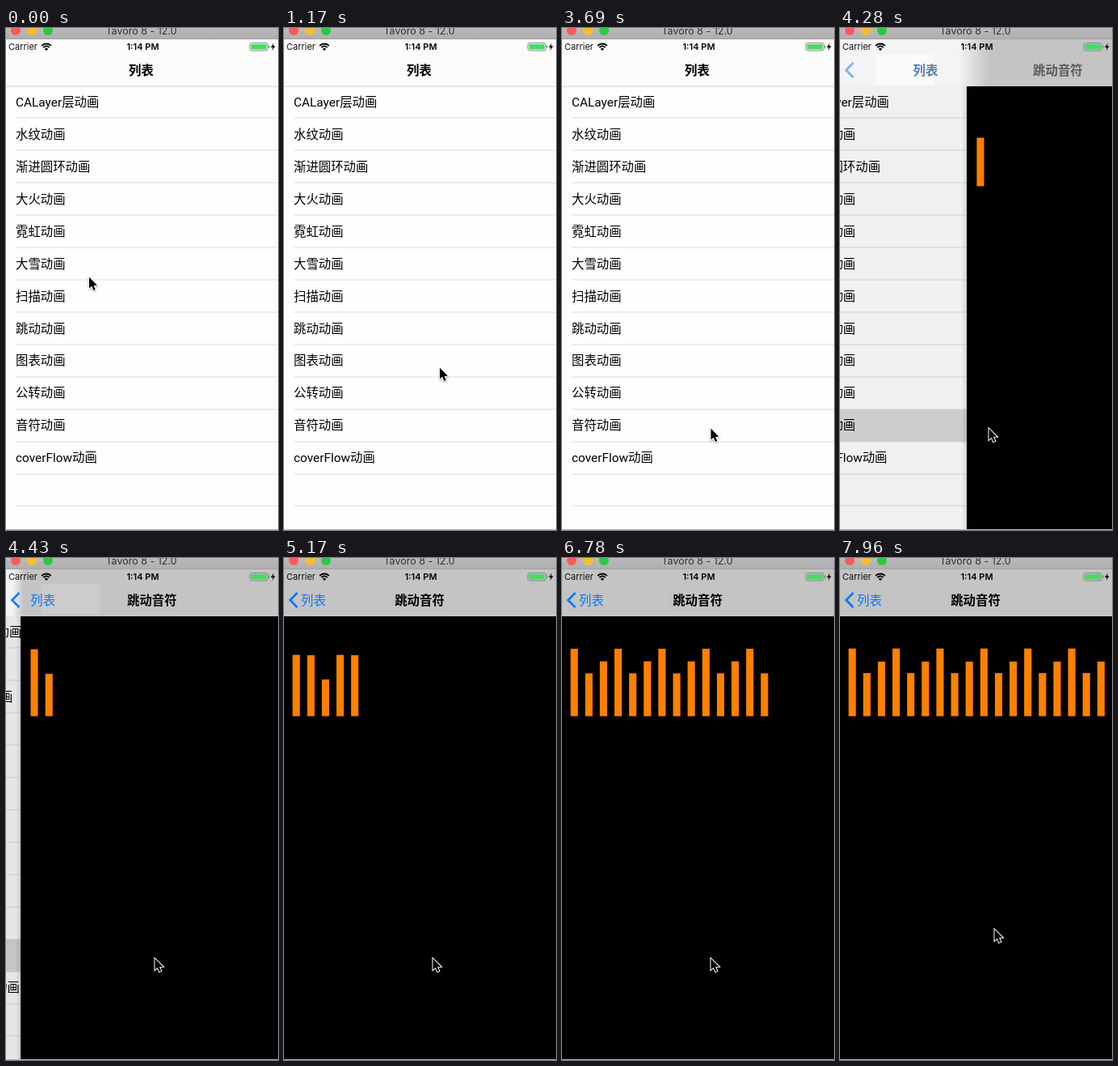
Animation of 337 by 620 pixels, one loop 8000 ms. Source, as an HTML page with a canvas:

```html
<!DOCTYPE html>
<html lang="zh">
<head>
<meta charset="utf-8">
<style>
  html, body { margin: 0; width: 100%; height: 100%; overflow: hidden; background: #fff; }
  canvas { display: block; }
</style>
</head>
<body>
<canvas id="stage" width="337" height="620"></canvas>
<script>
const ctx = document.getElementById('stage').getContext('2d');
const W = 337, H = 620, LOOP = 8000;
const STEP = 147.4;
const CAPTURE = 150.25;
const LIST_FONT = '15.4px Roboto, "Noto Sans CJK SC", "Noto Sans CJK", sans-serif';
const UI_FONT = 'Inter, "Noto Sans", sans-serif';
const ROWS = ['CALayer层动画', '水纹动画', '渐进圆环动画', '大火动画', '霓虹动画', '大雪动画',
  '扫描动画', '跳动动画', '图表动画', '公转动画', '音符动画', 'coverFlow动画'];
const ROW_H = 39.93, SELECTED = 10, NAV_BOTTOM = 72;

// Pointer path: step, x, y
const POINTER = [
  [0, 103, 307], [1, 113, 313], [3, 180, 345], [5, 221, 385], [8, 193, 419], [9, 193, 419],
  [11, 165, 399], [13, 144, 430], [15, 154, 468], [17, 169, 455], [23, 169, 455],
  [25, 184.5, 494], [48, 184.5, 494], [51, 191.5, 458], [60, 191.5, 458]
];

const mix = (a, b, p) => a + (b - a) * p;

function rect(x, y, w, h, color) {
  ctx.fillStyle = color;
  ctx.fillRect(x, y, w, h);
}

function text(str, x, y, font, color, align = 'left', alpha = 1) {
  ctx.globalAlpha = alpha;
  ctx.font = font;
  ctx.fillStyle = color;
  ctx.textAlign = align;
  ctx.fillText(str, x, y);
  ctx.globalAlpha = 1;
}

function polygon(...points) {
  ctx.beginPath();
  for (let i = 0; i < points.length; i += 2) ctx.lineTo(points[i], points[i + 1]);
  ctx.closePath();
}

function gradient(x0, y0, x1, y1, from, to) {
  const g = ctx.createLinearGradient(x0, y0, x1, y1);
  g.addColorStop(0, from);
  g.addColorStop(1, to);
  return g;
}

function drawList(shift, p) {
  rect(0, NAV_BOTTOM, W, H, '#fefefe');
  if (p > 0) rect(0, NAV_BOTTOM - 0.3 + SELECTED * ROW_H, W, ROW_H, '#d9d9d9');
  for (let i = 0; i < 13; i++) {
    const y = Math.round(NAV_BOTTOM - 0.6 + (i + 1) * ROW_H);
    rect(12 - shift, y - 0.5, W + shift, 1, '#dedede');
    if (ROWS[i]) text(ROWS[i], 12 - shift, 97 + i * ROW_H, LIST_FONT, '#000');
  }
  rect(0, NAV_BOTTOM, W, H, `rgba(0,0,0,${0.1 * p})`);
}

function drawDetail(left, time) {
  rect(left - 6, NAV_BOTTOM, 6, H, gradient(left - 6, 0, left, 0, 'rgba(0,0,0,0)', 'rgba(0,0,0,.12)'));
  rect(left, NAV_BOTTOM, W + 4, H, '#000');
  for (let i = 0; i < 18; i++) {
    const local = time - i * 200;
    if (local < 0) break;
    const rise = 1 - Math.abs(local / 300 % 2 - 1);
    const top = 150.2 - 45.5 * rise;
    rect(left + 12.4 + i * 18.13, top, 9.1, 195.4 - top, '#ff8000');
  }
}

function drawNav(p, left) {
  if (p > 0) {
    rect(0, 14, W, NAV_BOTTOM - 14, gradient(left - 10, 0, left + 60 * (1 - p), 0, '#f4f4f4', '#c4c4c4'));
    rect(44, 33, 72, 37, `rgba(255,255,255,${2.4 * p * (1 - p)})`);
  } else {
    rect(0, 14, W, NAV_BOTTOM - 14, '#fcfcfc');
    rect(0, NAV_BOTTOM - 0.3, W, 1, '#cfcfcf');
  }

  const titleX = mix(167.5, 36.5, p ** 1.2);
  if (p < 1) text('列表', titleX, 57.5, '600 ' + LIST_FONT, '#000', 'center', 1 - p);
  if (p > 0) {
    text('列表', titleX, 57.5, LIST_FONT, '#007aff', 'center', p);
    text('跳动音符', mix(386, 168, p), 57.5, '600 ' + LIST_FONT, '#000', 'center', p);
    ctx.globalAlpha = p;
    ctx.strokeStyle = '#007aff';
    ctx.lineWidth = 2.6;
    ctx.beginPath();
    ctx.moveTo(16.5, 43);
    ctx.lineTo(7.5, 52);
    ctx.lineTo(16.5, 61);
    ctx.stroke();
    ctx.globalAlpha = 1;
  }
}

function drawStatus() {
  text('Carrier', 3, 27, '11px ' + UI_FONT, '#111');
  text('1:14 PM', 169.5, 27, '600 11px ' + UI_FONT, '#000', 'center');

  // Wi-Fi
  ctx.strokeStyle = '#000';
  ctx.lineWidth = 1.9;
  for (const r of [8, 5]) {
    ctx.beginPath();
    ctx.arc(50, 27.5, r, -Math.PI * 0.76, -Math.PI * 0.24);
    ctx.stroke();
  }
  ctx.beginPath();
  ctx.moveTo(50, 28);
  ctx.arc(50, 28, 3, -Math.PI * 0.76, -Math.PI * 0.24);
  ctx.fillStyle = '#000';
  ctx.fill();

  // Battery
  ctx.strokeStyle = '#888';
  ctx.lineWidth = 1;
  ctx.beginPath();
  ctx.roundRect(302, 18.5, 22.5, 9.5, 2.5);
  ctx.stroke();
  rect(303.5, 20, 19.5, 6.5, '#4cd964');
  rect(325.3, 21.7, 1.3, 3, '#888');
  polygon(331.8, 18.5, 328, 24, 330.6, 24, 329.6, 28, 333.6, 22.3, 331, 22.3);
  ctx.fillStyle = '#000';
  ctx.fill();
}

function drawWindow() {
  rect(0, 0, W, 13, gradient(0, 0, 0, 13, '#bababa', '#afafaf'));
  rect(0, 13, W, 1, '#a2a2a2');
  ['#fc5b57', '#fdbc2e', '#2ac940'].forEach((color, i) => {
    ctx.beginPath();
    ctx.arc(12 + 20 * i, 3, 6, 0, 7);
    ctx.fillStyle = color;
    ctx.fill();
  });
  text('Tavoro 8 - 12.0', 167.5, 8, '12.5px ' + UI_FONT, '#333', 'center');
  rect(0, 619, W, 1, '#b4b4b4');
}

function drawPointer(step) {
  const next = POINTER.findIndex(point => point[0] > step);
  const [k0, x0, y0] = POINTER[next - 1], [k1, x1, y1] = POINTER[next];
  const p = (step - k0) / (k1 - k0);
  ctx.save();
  ctx.translate(mix(x0, x1, p), mix(y0, y1, p));
  polygon(0, 0.8, 0, 14.6, 3.2, 11.7, 5.5, 17, 7.8, 16, 5.6, 10.9, 10, 10.7);
  ctx.shadowColor = 'rgba(0,0,0,.35)';
  ctx.shadowBlur = 2;
  ctx.shadowOffsetY = 1;
  ctx.strokeStyle = '#fff';
  ctx.lineWidth = 2;
  ctx.stroke();
  ctx.shadowColor = 'transparent';
  ctx.fillStyle = '#000';
  ctx.fill();
  ctx.restore();
}

function draw(now) {
  const step = Math.floor((now % LOOP + 16) / STEP);
  const time = 97 + (step - 29) * CAPTURE;   // since the row was tapped
  const eased = 0.0184 * time;
  let p = time < 0 ? 0 : 1 - (1 + eased) * Math.exp(-eased);
  if (p > 0.998) p = 1;
  const left = mix(338, -1.8, p);

  if (p < 1) drawList(102 * p, p);
  if (p > 0) drawDetail(left, time);
  drawNav(p, left);
  drawStatus();
  drawWindow();
  drawPointer(step);
}

const start = performance.now();
function tick() {
  draw(performance.now() - start);
  requestAnimationFrame(tick);
}
tick();
</script>
</body>
</html>
```
